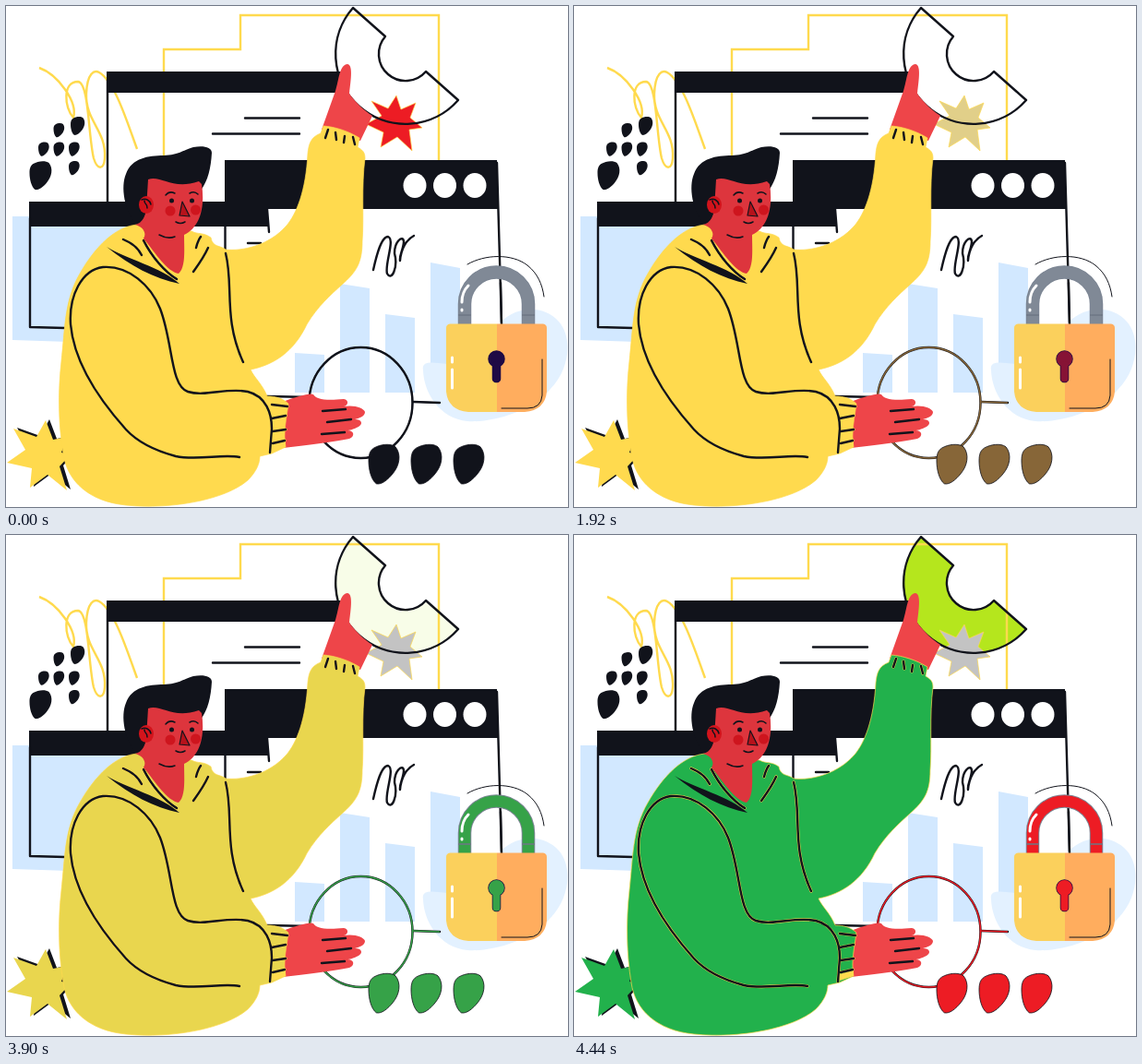
Animation, 609 px wide and 543 px high, one loop 4640 ms. Source, as an HTML page:

```html
<!DOCTYPE html>
<html lang="en">
<head>
<meta charset="utf-8">
<title>Data security illustration</title>
<style>
  :root {
    --ink: #11131b; --yellow: #ffda4e; --red: #ed1c24; --green: #22b14c;
    --grey: #c3c3c3; --steel: #808996; --navy: #1f0a45; --sky: #d2e8ff; --skin: #ee4549;
  }
  html, body { margin: 0; width: 100%; height: 100%; overflow: hidden; background: #fff; }
  svg { display: block; width: 100vw; height: 100vh; }
  .line { fill: none; stroke: var(--ink); stroke-width: 2.4; stroke-linecap: round; stroke-linejoin: round; }
  .sketch { fill: none; stroke: var(--yellow); stroke-width: 2.4; }
  .ink { fill: var(--ink); }
  .sky { fill: var(--sky); }
  .skin { fill: var(--skin); }
  .face { fill: #dd353d; }
  .shine { fill: none; stroke: #fff; stroke-width: 3; stroke-linecap: round; }

  /* Each fade runs 600 ms in ten 60 ms steps, then holds. */
  .tint { fill: currentColor; animation: 4.64s steps(10) infinite; }
  .burst { animation-name: burst; }
  .lights { animation-name: lights; }
  .keyhole { animation-name: keyhole; }
  .drops { animation-name: drops; }
  .shackle { animation-name: shackle; }
  .ring { animation-name: ring; }
  .hoodie { animation-name: hoodie; }

  @keyframes burst {
    0%, 3.017% { color: var(--red); }
    15.948%, 34.914% { color: var(--yellow); }
    47.845%, 100% { color: var(--grey); }
  }
  @keyframes lights {
    0%, 3.017% { color: #fff; }
    15.948%, 18.966% { color: var(--green); }
    31.897%, 100% { color: #fff; }
  }
  @keyframes keyhole {
    0%, 34.914% { color: var(--navy); }
    47.845%, 50.862% { color: var(--red); }
    63.793%, 82.759% { color: var(--green); }
    95.69%, 100% { color: var(--red); }
  }
  @keyframes drops {
    0%, 36.206% { color: var(--ink); }
    36.207% { color: #36a248; animation-timing-function: steps(9); }
    47.845%, 50.862% { color: var(--red); }
    63.793%, 82.759% { color: var(--green); }
    95.69%, 100% { color: var(--red); }
  }
  @keyframes shackle {
    0%, 66.81% { color: var(--steel); }
    79.741%, 82.759% { color: var(--green); }
    95.69%, 100% { color: var(--red); }
  }
  @keyframes ring {
    0%, 82.759% { color: #fff; }
    95.69%, 100% { color: #b5e61d; }
  }
  @keyframes hoodie {
    0%, 82.759% { color: var(--yellow); }
    95.69%, 100% { color: var(--green); }
  }
</style>
</head>
<body>
<svg viewBox="0 0 609 543" preserveAspectRatio="none">
  <defs>
    <path id="drop" d="M4 3C9 0 17 -1 21 2C26 8 24 17 19 23C15 28 10 32 6 31C2 28 0 20 0 13C0 8 1 5 4 3Z"/>
    <path id="spark" d="M43 449L51 470L66 467L60 484L70 486L58 499L66 525L45 508L26 522L28 501L1 495L21 481L8 458L33 467Z"/>
    <path id="donut" d="M376 2A75.800 75.800 0 0 0 490 102L455 71A29 29 0 0 1 411 33Z"/>
    <path id="bow" d="M497 345V323A34.500 34.500 0 0 1 566 323V345"/>
    <g id="hole"><circle cx="531.500" cy="382.500" r="8.500"/><rect x="527.500" y="385" width="8" height="22.500" rx="3.500"/></g>
    <g id="loop"><ellipse cx="384.500" cy="430" rx="56" ry="60"/><path d="M441 429L470 430"/></g>
    <g id="folds">
      <path d="M253 489C235 485 208 493 184 488C158 481 142 472 130 459C104 430 74 390 70 345C68 314 82 286 105 283C133 281 157 303 167 328C181 364 178 412 197 418C216 424 240 413 262 418C282 423 288 442 288 458L286 484"/>
      <path d="M238 268C247 303 235 338 257 386"/>
      <path d="M127 253C137 257 143 262 147 270M149 254C158 272 172 288 185 296M219 262C214 273 208 281 203 288M211 250C208 254 207 258 206 262"/>
      <path d="M288 432L305 434M288 447L303 444M289 461L303 459M289 474L302 471"/>
      <path d="M349 134L346 143M357 137L358 145M367 141L366 148M376 142L378 150"/>
    </g>
  </defs>

  <!-- windows -->
  <path class="sky" d="M7 228H130V366L7 362Z"/>
  <use href="#donut" class="tint ring"/>
  <path class="sketch" d="M171 162V47H254V10H469V168"/>
  <path class="sketch" d="M36 67C56 74 78 104 73 121C63 110 61 82 78 82C90 83 89 140 95 165C99 178 106 178 107 165C109 135 86 125 87 95C88 72 96 69 101 72C118 82 131 125 142 155"/>
  <path class="ink" d="M109 71H364V94H109ZM25 212H237V167H532L533 220H283L284 239H25Z"/>
  <path class="line" d="M110 80V212M26 230V348L64 349M237.500 239V268M283 220L285 245M532 170L537 345M283 423L330 424M262 257H276"/>
  <path class="line" d="M259 121.500H318M224 138.500H318"/>
  <g class="tint lights">
    <ellipse cx="443" cy="194.500" rx="12.500" ry="13.500"/>
    <ellipse cx="475.500" cy="194.500" rx="12.500" ry="13.500"/>
    <ellipse cx="508" cy="194.500" rx="12.500" ry="13.500"/>
  </g>
  <path class="sky" d="M313 376L345 378V419H313ZM362 301L394 306V419H362ZM411 334L443 338V419H411ZM460 278L492 284V419H460Z"/>
  <path class="line" d="M398 286C402 268 407 250 414 250C422 253 410 280 413 290C418 299 425 283 421 268C421 255 430 248 431 255C431 263 426 270 427 276C428 263 434 253 442 249"/>

  <g class="ink">
    <use href="#drop" transform="translate(25.500 168)"/>
    <use href="#drop" transform="translate(70 120) scale(.64)"/>
    <use href="#drop" transform="translate(51.500 127) scale(.49)"/>
    <use href="#drop" transform="translate(35 147.500) scale(.49)"/>
    <use href="#drop" transform="translate(51.500 147.500) scale(.49)"/>
    <use href="#drop" transform="translate(68 147.500) scale(.49)"/>
    <use href="#drop" transform="translate(68 168) scale(.49)"/>
  </g>
  <use href="#spark" class="ink" x="4" y="-1"/>
  <use href="#spark" class="tint hoodie"/>

  <!-- upper star and ring outline -->
  <path class="tint burst" stroke="#ffda4e" stroke-width=".7" d="M423 97L428 112L444 105L438 121L451 132L437 134L440 157L424 142L406 153L409 137L390 128L407 119L396 103L414 111Z"/>
  <use href="#donut" class="line"/>

  <!-- padlock -->
  <path fill="#e3f1ff" d="M452 395C450 384 461 386 478 388L530 350C546 326 580 321 599 342C615 360 610 395 590 415C570 440 525 452 500 450C470 447 453 420 452 395Z"/>
  <path class="line" d="M536 300L537 345"/>
  <g fill="none">
    <use href="#bow" stroke="#7b8593" stroke-width="14.500"/>
    <use href="#bow" class="tint shackle" style="fill:none" stroke="currentColor" stroke-width="12.500"/>
    <path d="M490 335H504M559 335H573" stroke="#6d7785" stroke-width="1.500"/>
  </g>
  <path class="shine" d="M494 321C494 313 497 307 501 303M494 329V330"/>
  <path fill="#fbd05c" d="M532 344.500H481Q477 345 477 349V418Q479 438 501 440H532Z"/>
  <path fill="#ffad5e" d="M532 344.500H582Q586 345 586 349V418Q584 438 562 440H532Z"/>
  <path class="shine" d="M483.500 381V386M483.500 394V414"/>
  <path class="line" style="stroke-width:1" d="M500 280C519 269 548 268 565 281C576 290 581 301 583 315M581 383V422Q580 436 565 436H537"/>
  <use href="#hole" fill="#1f0a45" stroke="#1f0a45" stroke-width="1.500"/>
  <use href="#hole" class="tint keyhole"/>

  <!-- circle and drops -->
  <use href="#loop" class="line"/>
  <use href="#loop" class="tint drops" style="fill:none" stroke="currentColor" stroke-width="1.500"/>
  <g class="tint drops" stroke="#11131b" stroke-width=".6">
    <use href="#drop" transform="translate(393 475) scale(1.380)"/>
    <use href="#drop" transform="translate(439 475) scale(1.380)"/>
    <use href="#drop" transform="translate(485 475) scale(1.380)"/>
  </g>

  <!-- hands -->
  <path class="skin" d="M342 134L357 92C361 80 361 64 370 63C376 64 374 78 372 95C380 106 388 113 397 119L384 146Z"/>
  <path class="skin" d="M300 429C315 423 330 419 333 421C336 426 345 428 366 426C372 427 371 433 366 434C378 432 388 436 389 440C389 445 382 447 378 448C386 448 387 453 382 456C376 459 372 460 370 460C378 460 378 467 372 469C355 472 330 476 300 479Z"/>
  <path class="line" d="M343 439L368 437M348 451L374 448M342 464L367 462"/>

  <!-- hoodie -->
  <path class="tint hoodie" stroke="#ffda4e" stroke-width=".7" d="M142 237C119 239 97 260 80 290C63 319 64 350 60 385C56 420 57 455 62 485C66 515 90 537 130 541C180 546 238 535 262 514C272 504 275 495 275 488L288 485L303 478C300 462 304 447 306 431C300 425 292 423 283 423C278 410 269 403 265 394C290 389 312 375 326 345C338 325 352 313 364 302C380 288 386 278 386 255C388 230 385 195 389 165C389 158 386 156 381 153L383 143C370 135 356 131 344 130L341 138C330 142 328 150 327 160C325 200 315 225 304 238C285 260 255 266 238 264C232 259 224 262 222 251C214 245 208 248 201 244L150 240Z"/>
  <path fill="#ffda4e" d="M288 476L303 472V478L288 483Z"/>
  <use href="#folds" class="line" style="stroke:var(--yellow);stroke-width:3.200"/>
  <use href="#folds" class="line"/>
  <path class="ink" d="M109 261C128 273 170 284 188 301C160 295 135 282 109 261Z"/>

  <!-- head -->
  <path class="ink" d="M142 237C128 222 124 196 130 182C136 165 154 162 171 162C188 161 190 157 203 153C214 151 223 153 223 159C222 176 219 189 211 200L180 215Z"/>
  <path class="face" d="M154 188C168 183 180 200 209 190L212 193C216 218 210 240 193 248C193 264 195 283 187 290C174 288 160 265 149 252C153 246 148 239 140 237C148 235 151 228 152 220Z"/>
  <path class="line" style="stroke-width:1.800" d="M149 254C158 272 172 288 185 296"/>
  <ellipse cx="152" cy="215.500" rx="8" ry="9.500" fill="#d3141c"/>
  <path class="line" style="stroke-width:1.500" d="M147 210C152 208 156 211 157 215M150 211C150 216 153 213 153 219M173 205Q177 200 183 203M199 203Q204 200 208 204M184 234Q189 237 194 234M166 248Q175 253 183 250"/>
  <g fill="#ce151e"><circle cx="178" cy="222" r="5.500"/><circle cx="205.500" cy="221" r="5.500"/></g>
  <g class="ink"><circle cx="179.500" cy="211" r="2.500"/><circle cx="201.500" cy="211" r="2.500"/></g>
  <path d="M191 212L199 228L188 227Z" fill="#b5121b" stroke="#11131b" stroke-width="1.200" stroke-linejoin="round"/>
</svg>
</body>
</html>
```
